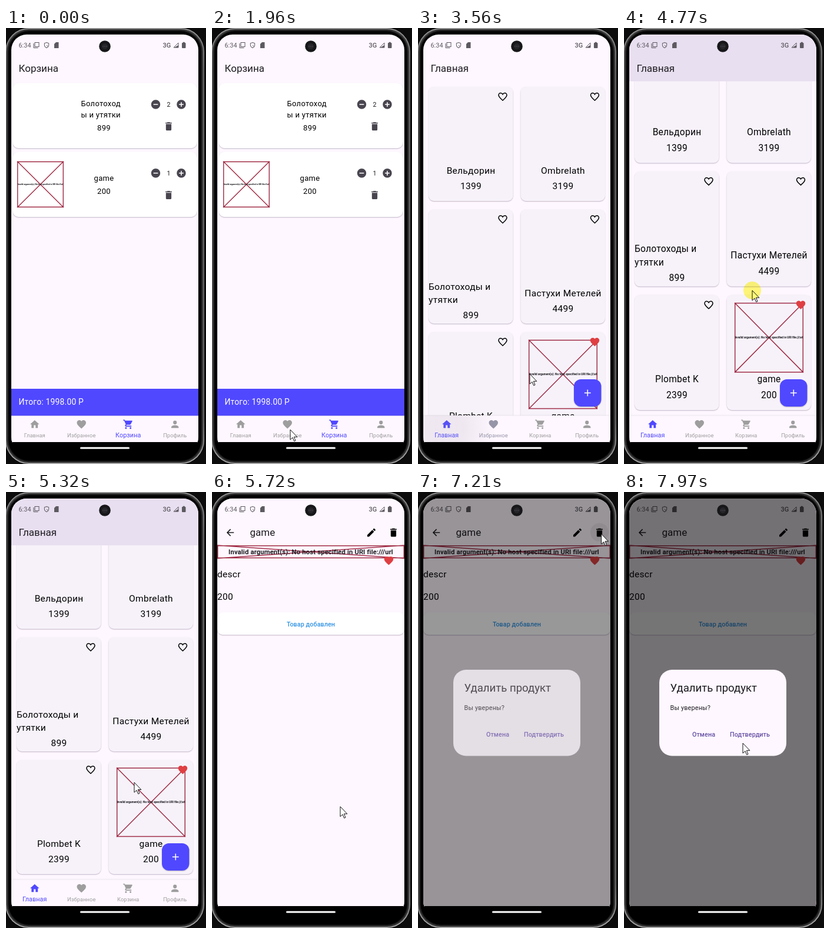
Recreate the animation shown at these times as an HTML page with a canvas. Size 340 by 736 pixels, loop 8000 ms.

```html
<!DOCTYPE html>
<html lang="ru">
<head>
<meta charset="utf-8">
<style>
html, body { margin: 0; height: 100%; overflow: hidden; background: #0c0c0c; }
canvas { display: block; width: 340px; height: 736px; }
</style>
</head>
<body>
<canvas></canvas>
<script>
const LOOP = 8000, BG = '#fef7ff', INK = '#1d1b20', BLUE = '#5048ff', RED = '#df3f42';
const cv = document.querySelector('canvas'), c = cv.getContext('2d');
const dpr = window.devicePixelRatio || 1;
cv.width = 340 * dpr;
cv.height = 736 * dpr;

const icons = {
  home: 'M10 20v-6h4v6h5v-8h3L12 3 2 12h3v8z',
  heart: 'M12 21.35l-1.45-1.32C5.4 15.36 2 12.28 2 8.5 2 5.42 4.42 3 7.5 3c1.74 0 3.41.81 4.5 2.09C13.09 3.81 14.76 3 16.5 3 19.58 3 22 5.42 22 8.5c0 3.78-3.4 6.86-8.55 11.54z',
  outline: 'M12 20C7 15.5 3 12.5 3 8.5 3 6 5 4 7.5 4c1.9 0 3.6 1.1 4.5 2.8C12.9 5.1 14.6 4 16.5 4 19 4 21 6 21 8.5c0 4-4 7-9 11.5z',
  cart: 'M7 18a2 2 0 1 0 0 4a2 2 0 1 0 0-4zM1 2v2h2l3.6 7.6-1.35 2.4C4.5 15.4 5.5 17 7 17h12v-2H7.4l1-2h7.2c.7 0 1.4-.4 1.7-1l3.6-6.5C21.3 4.8 20.8 4 20 4H5.2L4.3 2zM17 18a2 2 0 1 0 0 4a2 2 0 1 0 0-4z',
  person: 'M12 4a4 4 0 1 0 0 8a4 4 0 1 0 0-8zM12 14c-2.67 0-8 1.34-8 4v2h16v-2c0-2.66-5.33-4-8-4z',
  trash: 'M6 19c0 1.1.9 2 2 2h8c1.1 0 2-.9 2-2V7H6zM19 4h-3.5l-1-1h-5l-1 1H5v2h14z',
  edit: 'M3 17.25V21h3.75L17.8 9.94l-3.75-3.75zM20.7 7a1 1 0 0 0 0-1.4l-2.3-2.3a1 1 0 0 0-1.4 0l-1.85 1.85 3.75 3.75z',
  back: 'M20 11H7.83l5.6-5.6L12 4l-8 8 8 8 1.4-1.4L7.83 13H20z',
  add: 'M19 13h-6v6h-2v-6H5v-2h6V5h2v6h6z',
  minusDisc: 'M12 2a10 10 0 1 0 0 20a10 10 0 1 0 0-20zM7 11h10v2H7z',
  plusDisc: 'M12 2a10 10 0 1 0 0 20a10 10 0 1 0 0-20zM17 13h-4v4h-2v-4H7v-2h4V7h2v4h4z',
  shield: 'M12 2l8 3v6c0 5-3.5 9-8 11-4.5-2-8-6-8-11V5z',
  arrow: 'M0 0V17L4 13.3 6.7 19.5 9 18.5 6.4 12.3H11.8Z'
};
for (const k in icons) icons[k] = new Path2D(icons[k]);

const tabs = [['Главная', 'home'], ['Избранное', 'heart'], ['Корзина', 'cart'], ['Профиль', 'person']];
const goods = [
  [['Вельдорин'], 1399], [['Ombrelath'], 3199],
  [['Болотоходы и', 'утятки'], 899], [['Пастухи Метелей'], 4499],
  [['Plombet K'], 2399], [['game'], 200]
];
// pointer path: time, x, y
const path = [
  [270, 311, 243], [600, 240, 430], [1020, 90, 672], [1350, 143, 682], [1700, 133, 678],
  [2700, 133, 678], [3350, 46, 668], [3500, 46, 668], [3560, 190, 584], [4030, 226, 577],
  [4170, 228, 577], [4430, 227, 577], [4660, 218, 443], [5190, 218, 443], [5440, 218, 531],
  [5800, 218, 531], [6340, 306, 150], [6680, 313, 67], [7180, 313, 67], [7690, 193, 436], [7970, 202, 424]
];
const presses = [[1840, 1940], [3340, 3440], [4400, 4820], [5390, 5520], [6950, 7040]];

const clamp = (v, a = 0, b = 1) => Math.min(b, Math.max(a, v));
const ramp = (t, start, len) => clamp((t - start) / len);
const ease = p => p * p * (3 - 2 * p);
const mix = (a, b, p) => a + (b - a) * p;

function saved(draw) { c.save(); draw(); c.restore(); }

function box(x, y, w, h, r, fill) {
  c.beginPath();
  c.roundRect(x, y, w, h, r);
  c.fillStyle = fill;
  c.fill();
}

function disc(x, y, r, fill) {
  c.beginPath();
  c.arc(x, y, r, 0, 7);
  c.fillStyle = fill;
  c.fill();
}

function poly(...pts) {
  c.beginPath();
  pts.forEach(([x, y]) => c.lineTo(x, y));
}

function card(x, y, w, h, r, fill) {
  saved(() => {
    c.shadowColor = 'rgba(50,30,65,.3)';
    c.shadowBlur = 1.6 * dpr;
    c.shadowOffsetY = dpr;
    box(x, y, w, h, r, fill);
  });
}

function text(s, x, y, size, { color = INK, align = 'left', weight = 400, gap = 0 } = {}) {
  c.font = `${weight} ${size}px Roboto, sans-serif`;
  c.letterSpacing = gap + 'px';
  c.textAlign = align;
  c.fillStyle = color;
  c.fillText(s, x, y);
}

function icon(name, x, y, color, size = 18.6, line = 0) {
  saved(() => {
    c.translate(x - size / 2, y - size / 2);
    c.scale(size / 24, size / 24);
    c.fillStyle = c.strokeStyle = color;
    c.lineWidth = line;
    line ? c.stroke(icons[name]) : c.fill(icons[name], 'evenodd');
  });
}

function brokenImage(x, y, w, h, size) {
  c.strokeStyle = 'rgba(141,2,31,.81)';
  c.lineWidth = 1.5;
  c.beginPath();
  c.rect(x + .7, y + .7, w - 1.4, h - 1.4);
  c.moveTo(x, y);
  c.lineTo(x + w, y + h);
  c.moveTo(x + w, y);
  c.lineTo(x, y + h);
  c.stroke();
  saved(() => {
    c.shadowColor = 'rgba(0,0,0,.45)';
    c.shadowBlur = dpr * size / 11;
    text('Invalid argument(s): No host specified in URI file:///url', x + w / 2, y + h / 2 + size * .35, size,
      { align: 'center', weight: 500, gap: size * .018 });
  });
}

function product([lines, price], x, y, liked) {
  const style = { color: '#000', gap: .3 }, mid = { ...style, align: 'center' };
  card(x, y, 143.5, 193, 9, '#f7f2fa');
  if (lines[0] == 'game') brokenImage(x + 13.5, y + 13.2, 117, 117, 4.65);
  if (lines[1]) lines.forEach((s, i) => text(s, x, y + 135.5 + 22 * i, 15.5, style));
  else text(lines[0], x + 72, y + 146.5, 15.5, mid);
  text(price, x + 72, y + (lines[1] ? 183.5 : 173), 15.5, mid);
  icon(liked ? 'heart' : 'outline', x + 126, y + 17, liked ? RED : '#000', 18.6, liked ? 0 : 2);
}

function title(s, x = 21.5) { text(s, x, 74, 17); }

function cartPage() {
  title('Корзина');
  const style = { color: '#000', gap: .3 }, mid = { ...style, align: 'center' };
  [93, 209].forEach((y, i) => {
    card(11, y, 314, 110, 11, '#fff');
    icon('minusDisc', 254.5, y + 36, '#49454f');
    icon('plusDisc', 298, y + 36, '#49454f');
    icon('trash', 276.5, y + 73, '#49454f');
    text(2 - i, 276.5, y + 40, 10.8, { align: 'center' });
  });
  text('Болотоход', 127.5, 132, 13, style);
  text('ы и утятки', 127.5, 151, 13, style);
  text('899', 166.5, 173, 13, mid);
  brokenImage(19, 225, 79, 78, 3.1);
  text('game', 166.5, 258, 13, mid);
  text('200', 166.5, 280, 13, mid);
  box(9, 609, 318, 46, 0, BLUE);
  text('Итого: 1998.00 Р', 21.5, 636, 13.9, { color: '#fff', gap: .2 });
}

function favPage() {
  title('Избранное');
  product(goods[5], 18, 99, true);
}

function homePage(t) {
  const drag = t > 4430 ? 577 - pointer(Math.min(t, 4660))[1] : 0;
  const scroll = clamp(drag - 14, 0, 61);
  const stretch = .016 * (t < 4660 ? ramp(t, 4570, 90) : 1 - ease(ramp(t, 4660, 220)));
  saved(() => {
    c.beginPath();
    c.rect(9, 90, 318, 564);
    c.clip();
    c.translate(0, 654);
    c.scale(1, 1 + stretch);
    c.translate(0, -654 - scroll);
    goods.forEach((g, i) => product(g, i % 2 ? 174.5 : 18, 99 + 207 * (i >> 1), i == 5));
  });
  saved(() => {
    c.globalAlpha = ramp(t, 4480, 200);
    box(9, 11, 318, 79, 0, '#e8dff0');
  });
  title('Главная');
  card(265, 593, 46.5, 46, 12, BLUE);
  icon('add', 288.3, 616, '#fff');
}

function navBar(t) {
  const [start, now, old] = t < 1980 ? [-999, 2, 2] : t < 3400 ? [1980, 1, 2] : [3400, 0, 1];
  const p = ease(ramp(t, start, 200)), fade = 1 - ramp(t, start + 60, 480);
  saved(() => {
    c.beginPath();
    c.rect(9, 640, 318, 59);
    c.clip();
    c.shadowColor = 'rgba(0,0,0,.3)';
    c.shadowBlur = 3 * dpr;
    box(9, 654.5, 318, 45, 0, BG);
  });
  saved(() => {
    c.beginPath();
    c.rect(9, 654, 318, 45);
    c.clip();
    const x = 48.75 + 79.5 * now, g = c.createRadialGradient(x, 676, 30, x, 676, 85);
    g.addColorStop(0, `rgba(40,30,50,${.09 * fade})`);
    g.addColorStop(1, 'rgba(40,30,50,0)');
    if (start > 0) disc(x, 676, 20 + 65 * ramp(t, start, 150), g);
  });
  tabs.forEach(([name, pic], i) => {
    const on = i == now ? (now == old ? 1 : p) : i == old ? 1 - p : 0;
    const color = `rgb(${mix(158, 80, on)},${mix(158, 72, on)},${mix(158, 255, on)})`, x = 48.75 + 79.5 * i;
    icon(pic, x, 669, color);
    text(name, x, 690.5, mix(9.3, 10.8, on), { color, align: 'center', gap: .08 });
  });
}

function detailPage(t) {
  box(9, 11, 318, 689, 0, BG);
  icon('back', 31, 68.5, INK);
  title('game', 64.5);
  const glow = ramp(t, 6950, 90) * (1 - ramp(t, 7200, 200));
  disc(308.5, 68, 15.5, `rgba(29,27,32,${.07 * glow})`);
  icon('edit', 271, 68.5, '#000');
  icon('trash', 308.5, 68.5, '#000');
  brokenImage(9, 90, 318, 22, 11.2);
  icon('heart', 300.5, 116, RED);
  text('descr', 9, 143.5, 15.5, { color: '#000', gap: .3 });
  text('200', 9, 181.5, 15.5, { color: '#000', gap: .3 });
  card(9, 203, 318, 38, 9, '#fff');
  text('Товар добавлен', 168, 226.5, 10.8, { color: '#3394e4', align: 'center', weight: 500, gap: .05 });
}

function statusBar() {
  const grey = '#5d5960';
  text('6:34', 21.5, 33, 10.9, { color: grey });
  c.strokeStyle = grey;
  c.lineWidth = 1;
  c.strokeRect(49, 24.5, 7, 7);
  poly([47, 26], [47, 33.5], [54.5, 33.5]);
  c.stroke();
  icon('shield', 69, 29, grey, 11, 2.2);
  poly([69, 29], [72, 32]);
  c.stroke();
  text('3G', 266.5, 33, 11, { color: grey, weight: 500 });
  poly([85, 24], [89.5, 24], [89.5, 34], [82, 34], [82, 27]);
  c.fill();
  poly([293, 25], [293, 33], [285, 33]);
  c.closePath();
  c.stroke();
  poly([293, 29], [293, 33], [286, 33]);
  c.fill();
  box(299, 25, 6.5, 9, 1, grey);
  box(300.8, 23.8, 3, 2, 0, grey);
}

function dialog(t) {
  saved(() => {
    c.globalAlpha = ease(ramp(t, 7110, 150));
    box(9, 11, 318, 689, 0, 'rgba(0,0,0,.54)');
    box(60, 300, 216, 145.5, 21.5, BG);
    text('Удалить продукт', 78.5, 337, 18.6);
    text('Вы уверены?', 78.5, 368, 10.8, { gap: .2 });
    const style = { color: '#6750a4', align: 'center', weight: 500, gap: .05 };
    text('Отмена', 135.5, 412.5, 10.8, style);
    text('Подтвердить', 214, 412.5, 10.8, style);
  });
}

function pointer(t) {
  const i = path.findIndex(k => k[0] > t);
  if (i < 0) return path.at(-1).slice(1);
  const [t0, x0, y0] = path[Math.max(0, i - 1)], [t1, x1, y1] = path[i];
  const p = t1 > t0 ? ease(ramp(t, t0, t1 - t0)) : 0;
  return [mix(x0, x1, p), mix(y0, y1, p)];
}

function cursor(t) {
  if (t < 270) return;
  const [x, y] = pointer(t);
  saved(() => {
    c.translate(x, y);
    c.fillStyle = '#fff';
    c.strokeStyle = '#111';
    c.lineWidth = 1;
    c.fill(icons.arrow);
    c.stroke(icons.arrow);
    // the press highlight tints the arrow too
    c.globalCompositeOperation = 'multiply';
    if (presses.some(([a, b]) => t >= a && t < b)) disc(0, 0, 15, '#fffc78');
  });
}

function phone() {
  c.fillStyle = '#0c0c0c';
  c.fillRect(0, 0, 340, 736);
  const metal = c.createLinearGradient(0, 0, 0, 736);
  metal.addColorStop(0, '#a8a8a8');
  metal.addColorStop(.1, '#6a6a6a');
  metal.addColorStop(.9, '#6a6a6a');
  metal.addColorStop(1, '#c4c4c4');
  [metal, '#4a4a4a', '#2c2c2c', '#181818', '#000'].forEach((fill, i) => {
    const d = i * 1.4;
    box(d - 1, d, 338 - 2 * d, 736 - 2 * d, 40 - d, fill);
  });
}

function draw(t) {
  c.setTransform(dpr, 0, 0, dpr, 0, 0);
  phone();
  saved(() => {
    c.beginPath();
    c.roundRect(9, 11, 318, 709, [26, 26, 30, 30]);
    c.clip();
    box(9, 11, 318, 689, 0, BG);
    if (t < 5690) {
      t < 2030 ? cartPage() : t < 3525 ? favPage() : homePage(t);
      navBar(t);
    }
    if (t >= 5585) {
      c.globalAlpha = mix(.3, 1, ramp(t, 5585, 105));
      detailPage(t);
      c.globalAlpha = 1;
    }
    statusBar();
    dialog(t);
    box(9, 699, 318, 30, 0, '#000');
    box(126, 707.5, 84, 3, 1.5, '#fff');
  });
  disc(168, 31, 9.8, '#17171a');
  disc(168, 31, 5, '#26262a');
  [-3, 0, 3].forEach(d => disc(168 + d, 31, .7, '#55555c'));
  cursor(t);
}

function tick() {
  draw(performance.now() % LOOP);
  requestAnimationFrame(tick);
}
tick();
</script>
</body>
</html>
```
